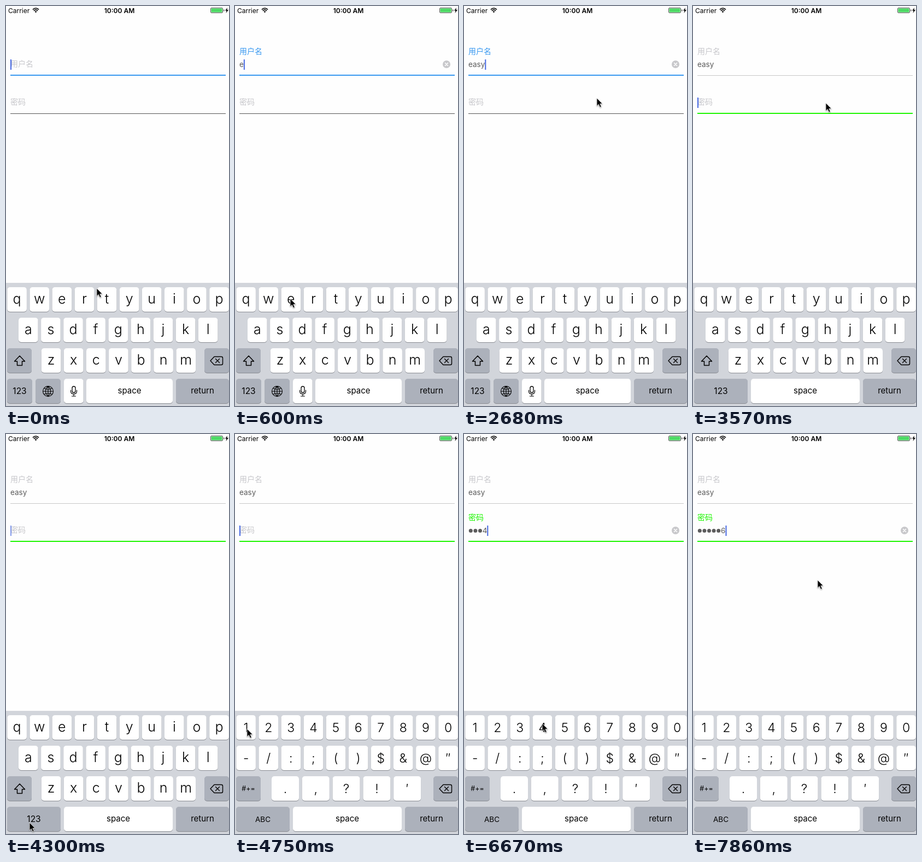
An HTML page for the animation above (8000 ms loop, 408 by 734 pixels).

```html
<!DOCTYPE html>
<html lang="zh">
<head>
<meta charset="utf-8">
<style>
html, body { margin: 0; width: 408px; height: 734px; overflow: hidden; background: #fefefe; }
svg { display: block; font-family: Inter, "Noto Sans CJK SC", "Noto Sans CJK", sans-serif; }
</style>
</head>
<body>
<svg id="stage" width="408" height="734" viewBox="0 0 408 734"></svg>
<script>
const LOOP = 8000, STEPS = 54;
const GREY = '#c7c7cb', BLUE = '#3898f0', GREEN = '#1df500', SPECIAL = '#acb1bb';
const stage = document.getElementById('stage');
const pen = document.createElement('canvas').getContext('2d');

// Pointer stops: step, x, y
const path = [
  [0, 166, 518], [3, 101, 537], [4, 101, 537], [6, 40, 590], [8, 84, 587], [9, 84, 594],
  [12, 84, 594], [14, 221, 537], [15, 221, 537], [18, 243, 169], [21, 243, 178], [24, 243, 178],
  [29, 43, 713], [30, 43, 713], [32, 22, 541], [36, 22, 541], [37, 59, 542], [39, 59, 542],
  [40, 101, 540], [41, 101, 540], [43, 143, 531], [45, 143, 531], [46, 176, 531],
  [48, 176, 531], [50, 217, 537], [52, 217, 537], [53, 228, 268]
];
const presses = { 3: 'e', 6: 'a', 11: 's', 12: 's', 14: 'y', 35: '1', 38: '2', 41: '3' };
const nameTimes = [3, 6, 11, 14], codeTimes = [35, 38, 41, 45, 48, 52];
const caretAlpha = { 19: .5, 20: 0, 26: .5, 27: 0, 28: 0, 29: .65 };
const typed = (times, n) => times.filter(s => s <= n).length;
const clamp = v => Math.max(0, Math.min(1, v));

const text = (s, x, y, size, extra = '') =>
  `<text x="${x}" y="${y}" font-size="${size}" ${extra}>${s.replace('&', '&amp;')}</text>`;
const middle = 'text-anchor="middle"';
const stroke = (d, width = 1.5, color = '#000') =>
  `<path d="${d}" fill="none" stroke="${color}" stroke-width="${width}" stroke-linejoin="round" stroke-linecap="round"/>`;
const box = (x, y, w, h, fill, r = 0) =>
  `<rect x="${x}" y="${y}" width="${w}" height="${h}" rx="${r}" fill="${fill}"/>`;

function key(x, y, w, label, size, fill = '#fff', dy = 0) {
  return box(x, y + 1, w, 45, '#898c92', 5) + box(x, y, w, 45, fill, 5) +
    text(label, x + w / 2, y + 27 + dy, size, middle);
}

function popup(label, cx, y, size) {
  const l = Math.max(2, cx - 31), r = cx + 31, kl = cx - 17.8, kr = cx + 17.8;
  const t = y - 62, b = y + 45;
  return `<path filter="drop-shadow(0 1px 2px #0005)" fill="#fff" d="M${l + 11} ${t}H${r - 11}
    Q${r} ${t} ${r} ${t + 11}V${t + 40}C${r} ${t + 54} ${kr} ${t + 53} ${kr} ${t + 70}V${b - 5}
    Q${kr} ${b} ${kr - 5} ${b}H${kl + 5}Q${kl} ${b} ${kl} ${b - 5}V${t + 70}
    C${kl} ${t + 53} ${l} ${t + 54} ${l} ${t + 40}V${t + 11}Q${l} ${t} ${l + 11} ${t}Z"/>` +
    text(label, (l + r) / 2, t + 41, size, middle + ' font-weight="300"');
}

function keyboard(n) {
  const numeric = n >= 30, secure = n >= 23, pressed = presses[n];
  const rows = numeric ? ['1234567890', '-/:;()$&@″', '.,?!′'] : ['qwertyuiop', 'asdfghjkl', 'zxcvbnm'];
  const starts = numeric ? [2.3, 2.3, 67] : [2.3, 23, 64.8];
  const size = numeric ? 23 : 25;
  let out = box(0, 508, 408, 226, '#d2d5db'), bubble = '';
  rows.forEach((row, r) => [...row].forEach((c, i) => {
    const wide = numeric && r === 2, y = 516 + r * 56;
    const x = starts[r] + i * (wide ? 55.8 : 41.1), w = wide ? 50 : 35.6;
    out += key(x, y, w, c, size, '#fff', numeric ? 4 : 3);
    if (c === pressed) bubble = popup(c, x + w / 2, y, numeric ? 38 : 40);
  }));
  out = `<g font-weight="300">${out}</g>`;

  out += key(2, 628, 45, numeric ? '#+=' : '', 12.5, SPECIAL) + key(363, 628, 45, '', 15, SPECIAL);
  if (!numeric) out += stroke('M25 642L34.5 652H29.5V659.5H20.5V652H15.5Z');
  out += stroke('M374 651L381 643.5H394Q396.5 643.5 396.5 646V656Q396.5 658.5 394 658.5H381ZM383.5 647.5L390.5 654.5M390.5 647.5L383.5 654.5', 1.4);

  out += secure ? key(2, 684, 98, numeric ? 'ABC' : '123', numeric ? 13.5 : 15.5, SPECIAL, 1)
    : key(2, 684, 46, '123', 15.5, SPECIAL, 1) + key(54, 684, 46, '', 15, SPECIAL) + key(106, 684, 35.6, '', 15);
  if (!secure) {
    out += stroke('M67.5 707a9.5 9.5 0 1 0 19 0a9.5 9.5 0 1 0-19 0M77 697.5V716.5M67.5 707H86.5M69.5 701.5Q77 705 84.5 701.5M69.5 712.5Q77 709 84.5 712.5M77 697.5Q67.5 707 77 716.5M77 697.5Q86.5 707 77 716.5', 1.1);
    out += `<rect x="121" y="698" width="6" height="11.5" rx="3" fill="none" stroke="#000" stroke-width="1.3"/>` +
      stroke('M118.5 705V707Q118.5 712 124 712Q129.500 712 129.500 707V705M124 712V716M120.500 716H127.500', 1.2);
  }
  const left = secure ? 106 : 147;
  out += key(left, 684, 305 - left, 'space', 15) + key(311, 684, 97, 'return', 15, SPECIAL);
  return out + bubble;
}

function statusBar() {
  return text('Carrier', 4, 13, 12) + text('10:00 AM', 207.5, 13, 12, middle + ' font-weight="600"') +
    stroke('M49.500 6.200Q54.500 1.800 59.500 6.200M51.300 8.400Q54.500 5.500 57.700 8.400', 1.6) +
    '<path d="M52.500 10Q54.500 8.300 56.500 10L54.500 12.500Z"/>' +
    '<rect x="374.500" y="3.500" width="22" height="9" rx="1.500" fill="#fff" stroke="#555"/>' +
    box(375.5, 4.500, 20, 7, '#4cd964') + box(398, 6.500, 1.5, 3, '#555') +
    '<path d="M405 3L401 8.500H403.500L402.500 13L407 7H404.300Z"/>';
}

function field(y, label, { color, focused, idle, lift, content, width, filled }, n) {
  const labelColor = lift > 0 && focused ? color : GREY;
  let out = text(label, 8, y + 5 - 23 * lift, 14, `fill="${labelColor}" font-weight="${lift > 0 && focused ? 500 : 400}"`);
  out += focused ? box(8, y + 20, 394, 2, color) : box(8, y + 21, 394, 1, idle);
  out += content;
  if (focused) {
    out += `<g opacity="${caretAlpha[n] ?? 1}">${box(8 + width, y - 8, 2, 19, '#4668e2')}</g>`;
    if (filled) out += `<circle cx="387" cy="${y + 1}" r="7" fill="#c8c8cb"/>` +
      stroke(`M384.500 ${y - 1.5}l5 5m0 -5l-5 5`, 1.6, '#fff');
  }
  return out;
}

function form(n) {
  const name = 'easy'.slice(0, typed(nameTimes, n));
  const count = typed(codeTimes, n);
  const dots = Math.max(0, count - 1);
  pen.font = '13.5px Inter, sans-serif';
  let code = '';
  for (let i = 0; i < dots; i++) code += `<circle cx="${12.3 + i * 8.6}" cy="177.500" r="3.500" fill="#5c5c5c"/>`;
  if (count) code += text(String(count), 8 + dots * 8.6, 182, 13.5, 'fill="#5c5c5c"');
  return field(106, '用户名', {
    color: BLUE, focused: n < 23, idle: '#c8c8c8', lift: clamp((n - 2) / 2), filled: name,
    content: text(name, 8, 112, 13.5, 'fill="#5c5c5c"'), width: pen.measureText(name).width
  }, n) + field(176, '密码', {
    color: GREEN, focused: n >= 23, idle: '#555', lift: clamp((n - 34) / 2), filled: count,
    content: code, width: count ? dots * 8.6 + 8.5 : 0
  }, n);
}

function pointer(n) {
  const i = path.findIndex(p => p[0] >= n);
  const b = path[i], a = path[Math.max(0, i - 1)];
  const k = b[0] > a[0] ? (n - a[0]) / (b[0] - a[0]) : 1;
  const x = a[1] + (b[1] - a[1]) * k, y = a[2] + (b[2] - a[2]) * k;
  return `<path transform="translate(${x} ${y})" filter="drop-shadow(0 1px 1px #0006)" stroke="#fff" stroke-width=".8"
    d="M0 0V14.500L3.300 11.400L5.800 17L8.300 15.900L5.900 10.500H10.300Z"/>`;
}

let shown = -1;
function tick(now) {
  const n = Math.floor((now % LOOP) / LOOP * STEPS);
  if (n !== shown) {
    stage.innerHTML = statusBar() + form(n) + keyboard(n) + pointer(n);
    shown = n;
  }
  requestAnimationFrame(tick);
}
tick(performance.now());
</script>
</body>
</html>
```
